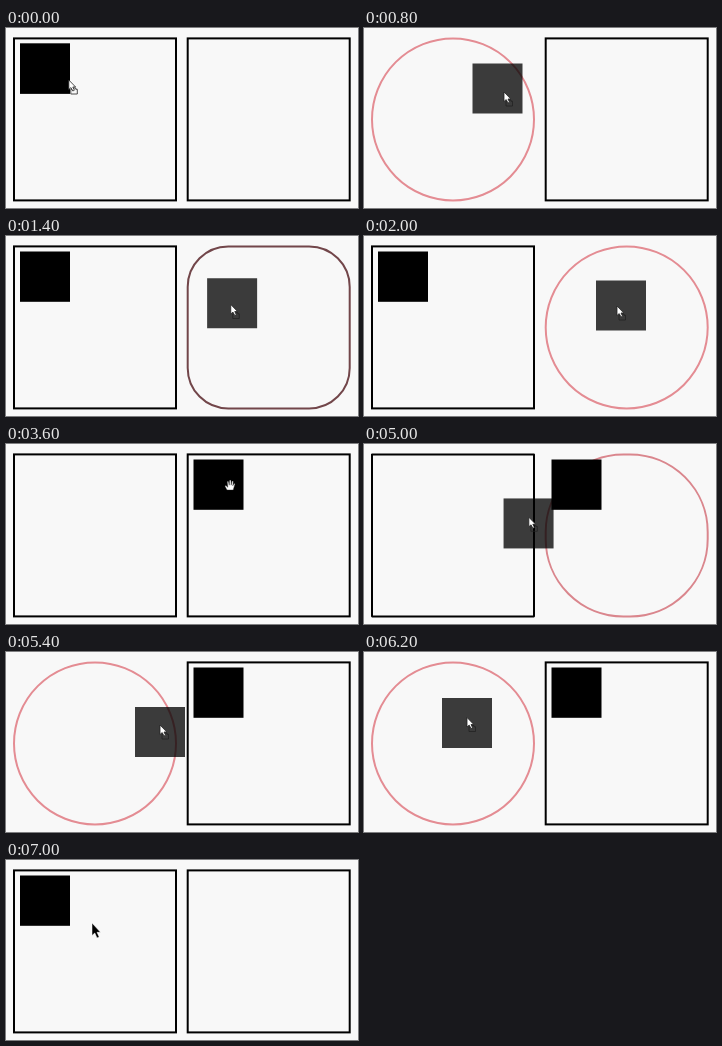
An HTML page that plays this animation: 352x180 px, repeating every 8.4 s.

```html
<!DOCTYPE html>
<html lang="en">
<head>
<meta charset="utf-8">
<title>Drag and drop</title>
<style>
  html, body { margin: 0; width: 100%; height: 100%; overflow: hidden; background: #f8f8f8; }
  svg { display: block; width: 100%; height: 100%; }
  .zone { fill: none; stroke-width: 2; }
</style>
</head>
<body>
<svg viewBox="0 0 352 180">
  <rect id="leftZone" class="zone" x="8" y="10.4" width="162" height="162"/>
  <rect id="rightZone" class="zone" x="181.7" y="10.4" width="162" height="162"/>
  <rect id="leftItem" x="14" y="15.5" width="50" height="50.3"/>
  <rect id="rightItem" x="187.5" y="15.5" width="50" height="50.3"/>
  <rect id="ghost" width="50" height="50" opacity=".76"/>
  <g id="cursor">
    <path id="arrow" d="M0 0V12.5L2.8 10L5 15L7.2 14L5 9.3H8.5Z" stroke="#fff" stroke-width=".5"/>
    <g id="drag" stroke="#222" stroke-width=".8">
      <path d="M2 9.3H4.5V8H7V9.3H8.5V14H2Z" fill="none"/>
      <path d="M0 0V9.5L2.2 7.6L4 11L5.6 10.2L4 7H6.8Z" fill="#fff"/>
    </g>
    <path id="hand" fill="#fff" stroke="#222" stroke-width=".4"
      d="M-1 6L-3 2.3Q-2.8 1.2-1.8 1.8L-.2 3.3L-.8-2.2Q-.1-3.2.6-2.2L1.2 1.2L1.5-3.5Q2.3-4.4 3-3.4L3.1 1.2L4-2.8Q4.8-3.5 5.3-2.5L4.8 1.8L5.9-.4Q6.8-.9 7-.1L5.2 6Z"/>
  </g>
</svg>
<script>
const LOOP = 8400, STEP = 200, MORPH = 400, RADIUS = 81;
const PINK = [228, 140, 147];
const el = id => document.getElementById(id);

// grip: the cursor's place within the dragged square
const home = { cursor: [62.8, 52], grip: [48.8, 36.5] };
const moves = [
  { start: 0, end: 800, cursor: [140, 64], grip: [31.5, 28.5] },
  { start: 800, end: 2000, cursor: [253, 70], grip: [21, 25.5] },
  { start: 2600, end: 3200, cursor: [222, 40], grip: [27, 23] },
  { start: 4200, end: 4400, cursor: [221.7, 74.5], grip: [26.7, 23] },
  { start: 4400, end: 5400, cursor: [154, 73], grip: [25, 18] },
  { start: 5400, end: 7000, cursor: [86, 63], grip: [25, 20] }
];

const drags = [[0, 2600], [4400, 6400]];
const hovers = [[3600, 4400]];
const zones = {
  left: { owns: [[0, 2600], [6400, LOOP]], over: [[100, 810], [4990, 6300]] },
  right: { owns: [[2600, 6400]], over: [[1200, 2500], [4335, 4950]] }
};

const during = (t, spans) => spans.some(([a, b]) => t >= a && t < b);
const show = (id, on) => el(id).setAttribute("display", on ? "inline" : "none");
const clamp = u => Math.min(1, Math.max(0, u));
const easeOut = u => 1 - (1 - clamp(u)) ** 2;
const smooth = u => clamp(u) ** 2 * (3 - 2 * clamp(u));
const mix = (a, b, u) => a.map((v, i) => v + (b[i] - v) * u);

function pose(t) {
  return moves.reduce((at, { start, end, cursor, grip }) => {
    const u = easeOut((t - start) / (end - start));
    return { cursor: mix(at.cursor, cursor, u), grip: mix(at.grip, grip, u) };
  }, home);
}

function drawZone(name, t) {
  const { owns, over } = zones[name];
  const k = Math.max(...over.map(([enter, leave]) =>
    smooth((t - enter) / MORPH) * (1 - smooth((t - leave) / MORPH))));
  const zone = el(name + "Zone");
  zone.setAttribute("rx", RADIUS * k);
  zone.setAttribute("stroke", `rgb(${PINK.map(c => Math.round(c * k))})`);
  show(name + "Item", during(t, owns) && !during(t, over));
}

function draw(time) {
  const t = Math.floor((time % LOOP) / STEP) * STEP;
  const { cursor: [x, y], grip } = pose(t);
  const dragging = during(t, drags);
  const hovering = during(t, hovers);

  Object.keys(zones).forEach(name => drawZone(name, t));

  show("ghost", dragging);
  el("ghost").setAttribute("x", x - grip[0]);
  el("ghost").setAttribute("y", y - grip[1]);

  el("cursor").setAttribute("transform", `translate(${x} ${y})`);
  show("drag", dragging);
  show("hand", hovering);
  show("arrow", !dragging && !hovering);
}

function tick() {
  draw(performance.now());
  requestAnimationFrame(tick);
}
tick();
</script>
</body>
</html>
```
